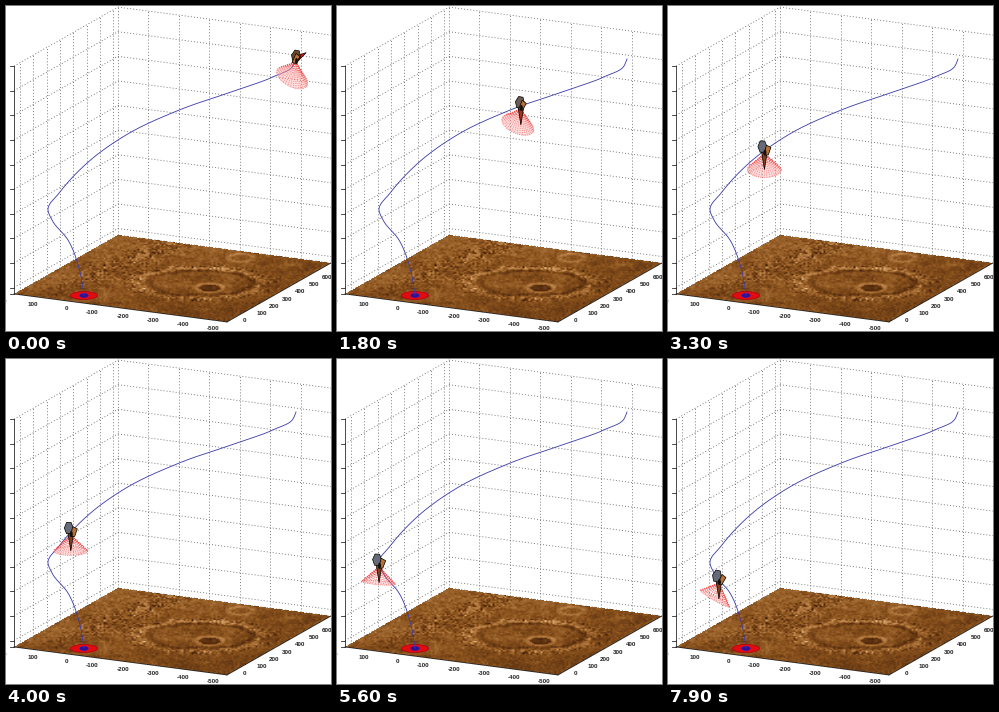
Write a matplotlib script that moves like this. It is 325 px wide and 325 px high and loops after 8000 ms.

```python
import numpy as np
import matplotlib.pyplot as plt
from matplotlib.animation import FuncAnimation
from matplotlib.collections import LineCollection
from matplotlib.patches import Ellipse, Polygon

SIZE, FRAMES, INTERVAL = 325, 80, 100
PX = 0.72  # points per pixel at 100 dpi

plt.rcParams["font.family"] = "Liberation Sans"
fig = plt.figure(figsize=(SIZE / 100, SIZE / 100), dpi=100, facecolor="white")
ax = fig.add_axes([0, 0, 1, 1])
ax.axis("off")

LEFT, BACK, FRONT = np.array([(8, 288), (112, 229), (221, 316)])
RIGHT = BACK + FRONT - LEFT
UP = np.array([0, -228])


def ease(x):
    x = np.clip(x, 0, 1)
    return x * x * (3 - 2 * x)


def fall(t, middle, width):
    """Soft step from 1 down to 0."""
    return 1 / (1 + np.exp((t - middle) / width))


def bump(x, middle, width):
    return np.exp(-((x - middle) / width) ** 2)


def mix(a, b, amount):
    return np.array(a) + (np.array(b) - np.array(a)) * amount


def turn(points, degrees):
    c, s = np.cos(np.radians(degrees)), np.sin(np.radians(degrees))
    return np.asarray(points) @ np.array([[c, s], [-s, c]])


def oval(center, rx, ry, angle, count):
    a = np.linspace(0, 2 * np.pi, count + 1)
    return center + turn(np.column_stack([rx * np.cos(a), ry * np.sin(a)]), angle)


def smooth_curve(points, samples=600):
    """Cubic Hermite curve, sampled evenly along its length."""
    points = np.array(points, float)
    knots = np.append(0, np.cumsum(np.hypot(*np.diff(points, axis=0).T)))
    slopes = np.gradient(points, knots, axis=0)
    t = np.linspace(0, knots[-1], samples)
    i = np.clip(np.searchsorted(knots, t, side="right") - 1, 0, len(knots) - 2)
    step = (knots[i + 1] - knots[i])[:, None]
    s = (t - knots[i])[:, None] / step
    return mix(points[i], points[i + 1], ease(s)) + step * s * (1 - s) * (
        (1 - s) * slopes[i] - s * slopes[i + 1])


def noise(rng, cell_x, cell_y):
    """Smoothly upsampled random grid covering the stage."""
    rows, cols = int(SIZE / cell_y) + 2, int(SIZE / cell_x) + 2
    grid = rng.normal(size=(rows, cols))
    pos = np.arange(SIZE)
    wide = np.array([np.interp(pos / cell_x, np.arange(cols), row) for row in grid])
    return np.array([np.interp(pos / cell_y, np.arange(rows), col) for col in wide.T]).T


def segment(a, b, **style):
    ax.plot([a[0], b[0]], [a[1], b[1]], **style)


def draw_walls():
    dotted = dict(color="#707070", lw=0.85 * PX, ls=(0, (1.2, 2.4)), zorder=1)
    solid = dict(color="#222222", lw=0.8 * PX, zorder=3)
    for z in [0, *np.arange(6.5, 229, 24.6)]:
        lift = np.array([0, -z])
        segment(LEFT + lift, BACK + lift, **dotted)
        segment(BACK + lift, RIGHT + lift, **dotted)
        segment(LEFT + lift - (4, 0), LEFT + lift, **solid)
    feet = [mix(BACK, RIGHT, k / 7) for k in range(8)]
    feet += [mix(LEFT, BACK, (6 + 13.3 * k) / 104) for k in range(8)]
    for foot in feet:
        segment(foot, foot + UP, **dotted)
    for a, b in ((LEFT, LEFT + UP), (LEFT, FRONT), (FRONT, RIGHT)):
        segment(a, b, **solid)


def draw_floor():
    rng = np.random.default_rng(4)
    y, x = np.mgrid[0:SIZE, 0:SIZE] + 0.5
    across, deep = FRONT - LEFT, BACK - LEFT
    to_floor = np.linalg.inv(np.column_stack([across, deep]))
    u, v = np.tensordot(to_floor, [x - LEFT[0], y - LEFT[1]], axes=1)
    inside = (abs(u - 0.5) <= 0.5) & (abs(v - 0.5) <= 0.5)

    warp = 0.05 * noise(rng, 12, 5)
    rim = np.hypot((x - 194) / 62, (y - 277) / 15) + warp
    pit = np.hypot((x - 203) / 13, (y - 282) / 4.5) + warp
    dent = np.hypot((x - 234) / 12, (y - 252) / 4) + warp
    rough = bump(u, 0.12 + 0.15 * v, 0.1) * ease(2 * v) + bump(rim, 1.05, 0.15)

    tone = 0.41 + 0.06 * v - 0.1 * u
    tone += 0.035 * noise(rng, 25, 9) + 0.035 * noise(rng, 7, 3)
    tone += (0.05 + 0.11 * rough) * noise(rng, 2, 1.3)
    tone += 0.16 * bump(rim, 1.02, 0.09) - 0.12 * bump(rim, 0.84, 0.08)
    tone += 0.2 * bump(pit, 1.05, 0.2) - 0.2 * (pit < 0.8)
    tone += 0.18 * bump(dent, 1, 0.3)

    stops = [0, 0.4, 0.65, 1]
    channels = [(48, 138, 186, 235), (18, 82, 130, 200), (4, 29, 72, 150)]
    rgb = [np.interp(tone, stops, c) / 255 for c in channels]
    ax.imshow(np.dstack([*rgb, inside.astype(float)]), extent=(0, SIZE, SIZE, 0),
              aspect="auto", interpolation="nearest", zorder=2)


def draw_labels():
    style = dict(fontsize=6.3 * PX, weight="bold", color="#222222", va="center")
    for k in range(-1, 7):
        ax.text(32 + 30.3 * k, 299 + 3.85 * k, f"{100 - 100 * k}", ha="right", **style)
    for k in range(7):
        ax.text(237 + 13.1 * k, 315 - 7.3 * k, f"{100 * k}", ha="left", **style)


def draw_path():
    ax.plot(*path.T, color="#3c3cac", lw=0.85 * PX, zorder=5)
    ax.add_patch(Ellipse((78, 289.5), 27, 8, fc="#e00c12", ec="#b00010", lw=0.5, zorder=4))
    ax.add_patch(Ellipse((78, 289.5), 8, 3.6, fc="#30108c", ec="#1a1ac0", lw=0.6, zorder=4))


path = smooth_curve([(290, 53), (287, 60), (269, 70), (234, 83), (172, 104.5), (120, 129),
                     (80, 158), (54, 186), (42, 204), (46, 214), (62, 234), (74, 266),
                     (78, 289)])
travelled = np.append(0, np.cumsum(np.hypot(*np.diff(path, axis=0).T)))
speed = 0.8 + 5.8 * fall(np.arange(FRAMES) + 0.5, 44, 3)
progress = np.append(0, np.cumsum(speed))

draw_walls()
draw_floor()
draw_labels()
draw_path()

outline = dict(ec="black", lw=0.7 * PX)
start = [(0, 0)] * 3
disc = ax.add_patch(Polygon(start, fc="#ffb4b4", alpha=0.45, lw=0, zorder=6))
spokes = LineCollection([], colors="#f04a4a", linewidths=0.6 * PX, alpha=0.75,
                        linestyles=[(0, (2, 1.5))], zorder=7)
ax.add_collection(spokes)
spike = ax.add_patch(Polygon(start, zorder=8, **outline))
shell = ax.add_patch(Polygon(start, zorder=9, **outline))
panel = ax.add_patch(Polygon(start, fc="#b87034", zorder=10, **outline))
core = ax.add_patch(Ellipse((0, 0), 3, 6, fc="#15100c", zorder=11))
ax.set_xlim(0, SIZE)
ax.set_ylim(SIZE, 0)


def update(frame):
    center = np.array([np.interp(progress[frame], travelled, axis) for axis in path.T])
    tilt = 42 * bump(frame, 8, 13) + 30 * ease((frame - 48) / 31)
    lean = 0.4 * tilt
    opened = ease((frame - 8) / 20)

    rim = oval(center + turn((0, 19), lean), 17, 2 + 7 * fall(frame, 38, 3), tilt, 36)
    disc.set_xy(rim)
    spokes.set_segments([[center + (0, 3), p] for p in rim] + [rim])

    # The fin swings from up-right to straight down at the start
    swing = ease(frame / 10)
    fin = turn([(0, -3), (mix(12, 19, swing), 0), (0, 3)], mix(-32, 90, swing))
    spike.set_xy(center + fin)
    spike.set_facecolor(mix((0.9, 0.08, 0.06), (0.5, 0.26, 0.12), ease(frame / 30)))

    shell.set_xy(oval(center + mix((0, -3), (-2, -4), opened), 4.5, 6.5, lean, 6))
    shell.set_facecolor(mix((0.42, 0.3, 0.18), (0.4, 0.42, 0.48), opened))
    box = [(-2.5, -5), (2.5, -4), (2, 4), (-2, 5)]
    panel.set_xy(center + mix((0, 0), (3, 0), opened) + turn(box, 15 + lean))
    core.set_center(center + (0.5, 2))
    return disc, spokes, spike, shell, panel, core


anim = FuncAnimation(fig, update, frames=FRAMES, interval=INTERVAL, repeat=True,
                     repeat_delay=0, blit=False)
plt.show()
```
